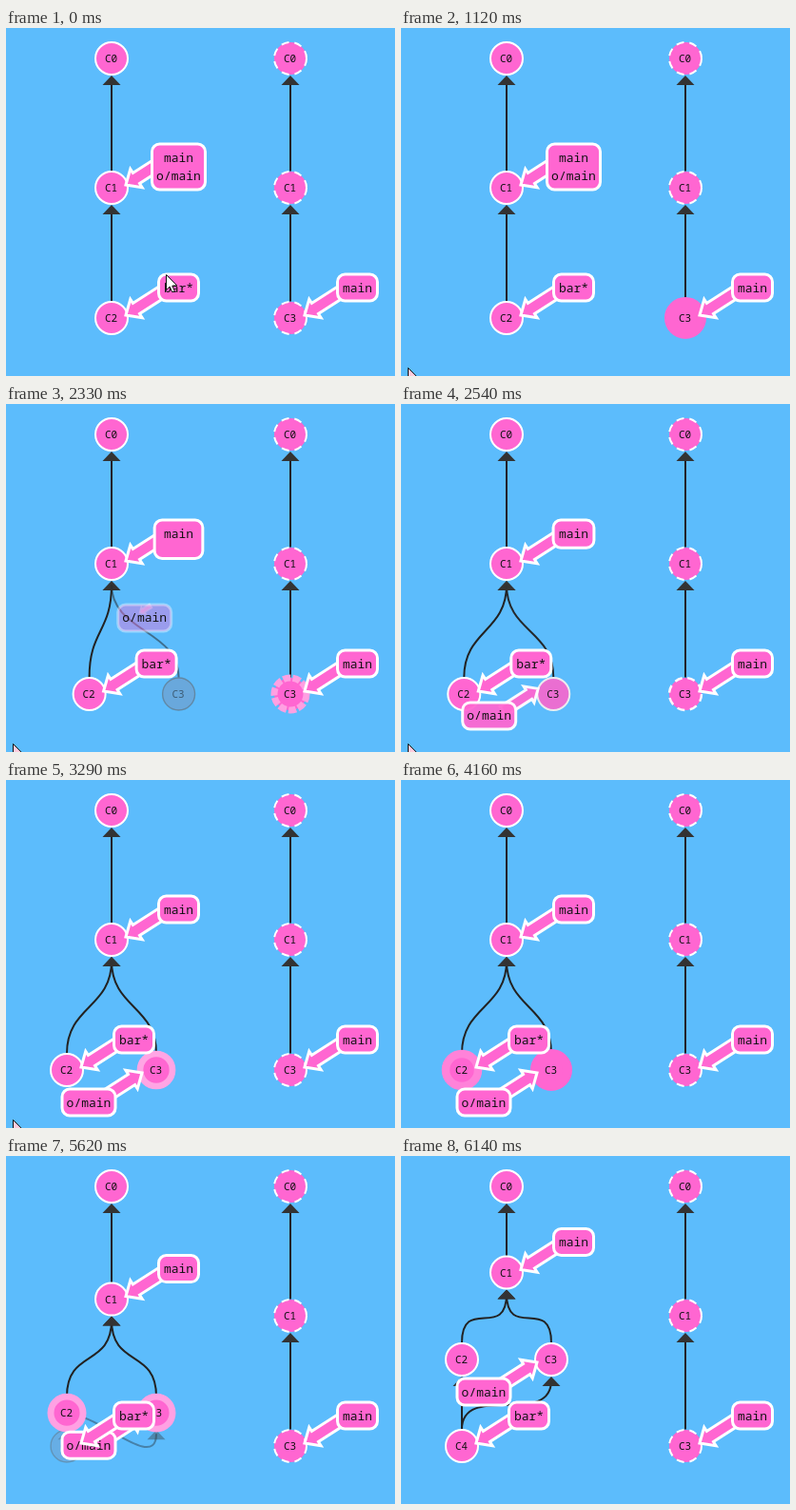
An HTML page with a canvas for the animation above (7390 ms loop, 409 by 366 pixels).

```html
<!DOCTYPE html>
<html lang="en">
<head>
<meta charset="utf-8">
<title>Commit tree</title>
<style>
html, body { margin: 0; width: 100%; height: 100%; overflow: hidden; background: #5cbcfc; }
canvas { display: block; }
</style>
</head>
<body>
<canvas id="stage" width="409" height="366"></canvas>
<script>
const ctx = document.getElementById('stage').getContext('2d');
const LOOP = 7390;
const PINK = [255, 102, 209], WHITE = [255, 255, 255], TEAL = [36, 179, 179], BLACK = [0, 0, 0];
const FONT = '"Noto Sans Mono", "DejaVu Sans Mono", monospace';

const lerp = (a, b, p) => a + (b - a) * p;
const mix = (a, b, p) => `rgb(${a.map((v, i) => Math.round(lerp(v, b[i], p)))})`;
const between = (a, b, p) => ({ x: lerp(a.x, b.x, p), y: lerp(a.y, b.y, p) });
const linear = (t, from, to) => Math.min(1, Math.max(0, (t - from) / (to - from)));
const ease = (t, from, to) => 0.5 - 0.5 * Math.cos(Math.PI * linear(t, from, to));

function polygon(points) {
  ctx.beginPath();
  points.forEach(([x, y]) => ctx.lineTo(x, y));
  ctx.closePath();
}

function withAlpha(alpha, draw) {
  if (alpha <= 0) return;
  ctx.save();
  ctx.globalAlpha = alpha;
  draw();
  ctx.restore();
}

function text(str, x, y, font) {
  ctx.font = font + ' ' + FONT;
  ctx.fillStyle = '#111';
  ctx.fillText(str, x, y);
}

// Line from the underside of the parent to the top of the child
function edge(child, parent, alpha = 1) {
  withAlpha(alpha, () => {
    const top = parent.y + 22, bottom = child.y - 17.5;
    ctx.strokeStyle = '#222';
    ctx.lineWidth = 2;
    ctx.beginPath();
    ctx.moveTo(child.x, bottom);
    ctx.bezierCurveTo(child.x, bottom - 50, parent.x, top + 50, parent.x, top);
    ctx.stroke();
    ctx.fillStyle = '#333';
    polygon([[parent.x, parent.y + 18], [parent.x + 9.5, parent.y + 28], [parent.x - 9.5, parent.y + 28]]);
    ctx.fill();
  });
}

// glow widens the ring and tints it; born runs from the pale new look to the usual one
function commit(name, { x, y }, { glow = 0, dashed = false, alpha = 1, born = 1 } = {}) {
  withAlpha(alpha, () => {
    ctx.beginPath();
    ctx.arc(x, y, 17, 0, 2 * Math.PI);
    ctx.fillStyle = mix(TEAL, PINK, born);
    ctx.fill();
    ctx.strokeStyle = born < 1 ? mix(BLACK, WHITE, born) : mix(WHITE, PINK, glow);
    ctx.lineWidth = lerp(1, 2, born) + 8 * glow;
    if (dashed && glow < 1) ctx.setLineDash([8, 6 * (1 - glow)]);
    ctx.stroke();
    ctx.setLineDash([]);
    text(name, x - 0.5, y + 4, '500 11px');
  });
}

// side is 1 for a label right of its commit, -1 for left
function label(name, at, node, { side = 1, alpha = 1, w = 42, h = 28 } = {}) {
  withAlpha(alpha, () => {
    const c = Math.cos(0.57), s = Math.sin(0.57);
    const shape = [[0, 0], [13, 11.5], [13, 6.6], [50, 6.6], [50, -6.6], [13, -6.6], [13, -11.5]];
    ctx.fillStyle = mix(PINK, PINK, 1);
    ctx.strokeStyle = '#fff';
    ctx.lineWidth = 3;
    polygon(shape.map(([u, v]) => [
      node.x + side * (15 + u * c - v * s),
      node.y + side * (-3 - u * s - v * c)
    ]));
    ctx.fill();
    ctx.stroke();
    ctx.beginPath();
    ctx.roundRect(at.x - w / 2, at.y - 14, w, h, 8);
    ctx.fill();
    ctx.stroke();
  });
  text(name, at.x, at.y + 4.5, '13px');
}

function cursor(x, y, fill) {
  polygon([[0, 0], [0, 16], [3.7, 12.6], [6.3, 18.3], [8.8, 17.2], [6.3, 11.6], [11.3, 11.4]]
    .map(([dx, dy]) => [x + 0.5 + dx, y + 0.5 + dy]));
  ctx.fillStyle = fill;
  ctx.fill();
  ctx.strokeStyle = '#111';
  ctx.lineWidth = 1;
  ctx.stroke();
}

function drawRemote(t, fetched) {
  const [c0, c1, c3] = [32, 168, 305].map(y => ({ x: 299, y }));
  edge(c1, c0);
  edge(c3, c1);
  commit('C0', c0, { dashed: true });
  commit('C1', c1, { dashed: true });
  commit('C3', c3, { dashed: true, glow: ease(t, 560, 1120) * (1 - fetched) });
  label('main', { x: 369.5, y: 273 }, c3);
}

function drawLocal(t, fetched) {
  const birth = ease(t, 1390, 2020);
  const merge = t < 5370 ? 0 : ease(t, 5245, 6130);
  const rise = 91 * merge;

  const c0 = { x: 111, y: 32 };
  const c1 = { x: 111, y: 168 - rise / 2 };
  const c2 = { x: 111 - 9 * birth - 38 * fetched, y: 305 - rise };
  const c3 = {
    x: lerp(111, 196, birth) - 38 * fetched,
    y: lerp(168, 305, birth) - rise
  };
  const c4 = { x: 64, y: 305 };
  const c3Alpha = lerp(0.2 * ease(t, 1390, 2120), 1, fetched);

  edge(c1, c0);
  edge(c2, c1);
  edge(c3, c1, c3Alpha);
  edge(c4, c2, merge);
  edge(c4, c3, merge);

  commit('C4', c4, { alpha: merge, born: merge });
  commit('C0', c0);
  commit('C3', c3, { alpha: c3Alpha, born: fetched, glow: ease(t, 2980, 3540) * (1 - merge) });
  commit('C1', c1);
  commit('C2', c2, { glow: ease(t, 3730, 4330) * (1 - merge) });

  label('main', { x: 181.5, y: c1.y - 32 }, c1, { w: lerp(56, 42, fetched), h: lerp(48, 28, fetched) });
  label('o/main',
    { x: lerp(181.5, 87, fetched), y: lerp(155.5, 339, fetched) - rise },
    between(c1, c3, fetched),
    { side: 1 - 2 * fetched, alpha: fetched, w: 56 });
  const tip = merge ? c4 : c2;
  label('bar*', { x: tip.x + 70.5, y: tip.y - 32 }, tip);
}

function frame(now) {
  const t = now % LOOP;
  const fetched = ease(t, 2120, 2620);
  ctx.fillStyle = '#5cbcfc';
  ctx.fillRect(0, 0, 409, 366);
  ctx.textAlign = 'center';
  drawRemote(t, fetched);
  drawLocal(t, fetched);
  if (t < 40) cursor(168, 259, '#fff');
  else if (t >= 580 && t < 3750) cursor(7, 357, '#fcd');
  requestAnimationFrame(frame);
}
requestAnimationFrame(frame);
</script>
</body>
</html>
```
